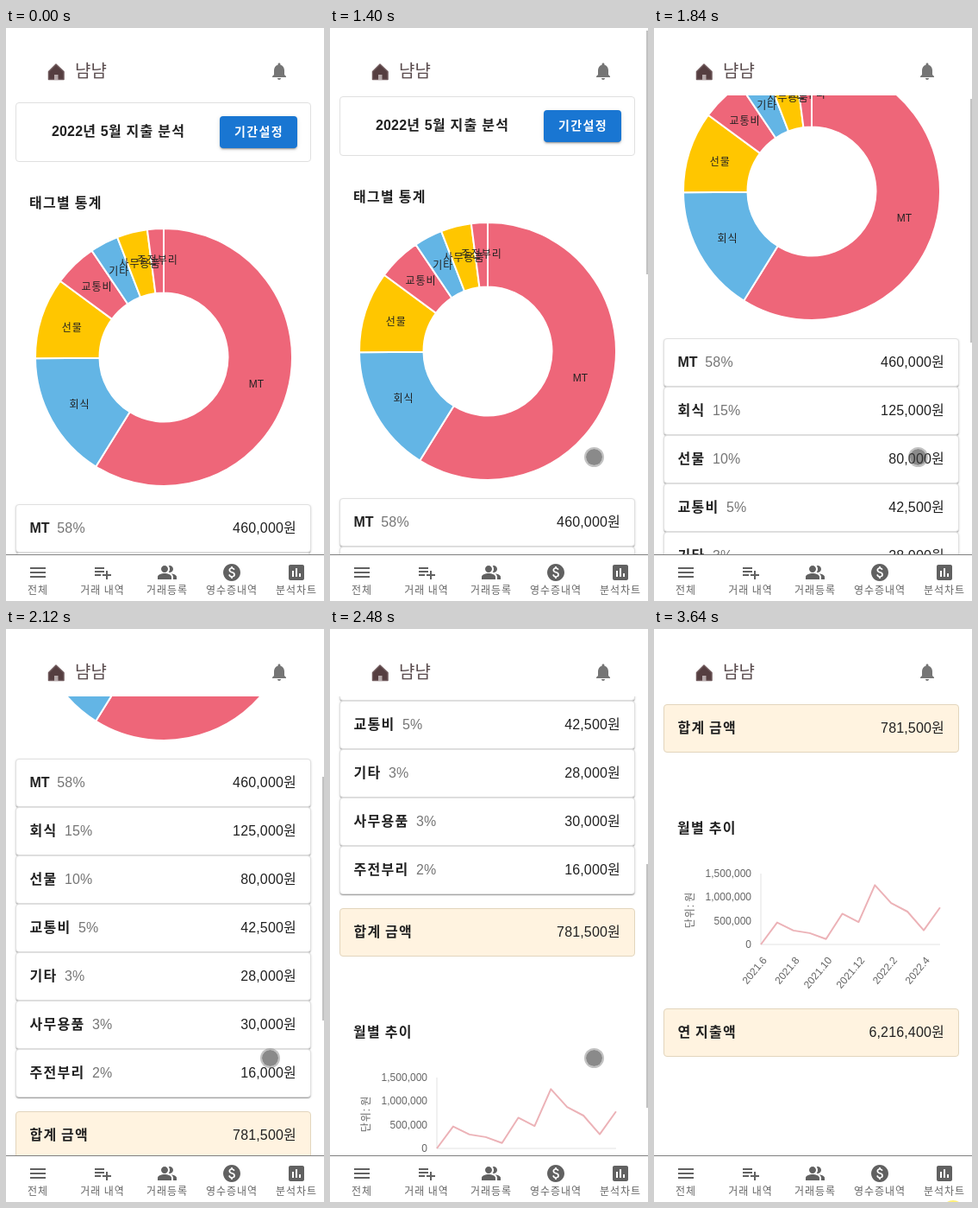
An HTML page that plays this animation: 369x663 px, repeating every 3.72 s.

```html
<!DOCTYPE html>
<html lang="ko">
<head>
<meta charset="utf-8">
<title>지출 분석</title>
<style>
  html, body { margin: 0; width: 100%; height: 100%; overflow: hidden; background: #fff; }
  #stage { position: relative; width: 369px; height: 663px; overflow: hidden; }
  #stage div, svg { position: absolute; box-sizing: border-box; }
  svg { left: 0; top: 0; }
  text { font: 16px "Liberation Sans", "Noto Sans CJK KR", "Noto Sans CJK", sans-serif; fill: #212121; letter-spacing: .15px; }
  .ko { letter-spacing: .08em; }
  .bold { font-weight: 700; }
  .button { font-size: 14px; font-weight: 700; fill: #fff; }
  .button .ko { letter-spacing: .1em; }
  .small { font-size: 12px; letter-spacing: 0; }
  .axis { fill: #666; }
  .tab { font-weight: 300; }
  .brand { font-size: 20px; font-weight: 300; fill: #5a4c4e; }
  .brand .ko { letter-spacing: 0; }
  #view { left: 0; top: 78px; width: 369px; height: 531px; overflow: hidden; }
  #page { left: 0; top: -78px; width: 369px; height: 1560px; }
  .box { left: 11px; width: 343px; height: 56px; border-radius: 4px; background: #fff; border: 1px solid #e0e0e0; }
  .card { box-shadow: 0 2px 1px -1px rgba(0,0,0,.2), 0 1px 1px rgba(0,0,0,.14), 0 1px 3px rgba(0,0,0,.12); }
  .sum { background: #fff3e0; border-color: #e2d5bd; }
  #period { left: 248px; top: 102px; width: 90px; height: 37px; border-radius: 4px; background: #1976d2;
    box-shadow: 0 3px 1px -2px rgba(0,0,0,.2), 0 2px 2px rgba(0,0,0,.14), 0 1px 5px rgba(0,0,0,.12); }
  #nav { left: 0; top: 609px; width: 369px; height: 54px; border-top: 1px solid #808080; background: #fff; }
  #bar { left: 367px; top: 0; width: 2px; height: 282px; background: #c2c2c2; }
  #touch { left: 0; top: 485px; width: 23px; height: 23px; border-radius: 50%; background: rgba(60,60,60,.6);
    background-clip: padding-box; border: 2px solid rgba(120,120,120,.45); }
</style>
</head>
<body>
<div id="stage">
  <div id="view"><div id="page"></div></div>
  <div id="nav"></div>
  <svg id="chrome" width="369" height="663"></svg>
  <div id="bar"></div>
  <div id="touch"></div>
</div>
<script>
const $ = id => document.getElementById(id);
const LOOP = 3720, TICK = 40;

const items = [
  ['MT', 460000, 58], ['회식', 125000, 15], ['선물', 80000, 10], ['교통비', 42500, 5],
  ['기타', 28000, 3], ['사무용품', 30000, 3], ['주전부리', 16000, 2]
];
const total = items.reduce((sum, item) => sum + item[1], 0);
const won = n => n.toLocaleString('en-US') + '원';

const spaced = s => s.replace(/[가-힣]+/g, '<tspan class="ko">$&</tspan>');
const text = (x, y, s, cls = '', anchor = 'start', extra = '') =>
  `<text x="${x}" y="${y}" class="${cls}" text-anchor="${anchor}" ${extra}>${spaced(s)}</text>`;
const box = (y, cls, h = 56) => `<div class="box ${cls}" style="top:${y}px;height:${h}px"></div>`;
const row = (y, label, amount, percent) =>
  `<text x="27.4" y="${y}"><tspan class="bold">${spaced(label)}</tspan>` +
  (percent ? `<tspan dx="8.5" fill="#757575">${percent}%</tspan>` : '') + '</text>' +
  text(338, y, won(amount), '', 'end');

function donut(cx, cy, outer, inner) {
  const colors = ['#ee6679', '#63b5e5', '#ffc600'];
  const at = (r, turn) => [cx + r * Math.sin(turn * 2 * Math.PI), cy - r * Math.cos(turn * 2 * Math.PI)];
  let slices = '', labels = '', start = 0;
  items.forEach(([label, amount], i) => {
    const end = start + amount / total, big = +(end - start > .5);
    slices += `<path fill="${colors[i % 3]}" stroke="#fff" stroke-width="2" d="M${at(outer, start)}
      A${outer} ${outer} 0 ${big} 1 ${at(outer, end)}L${at(inner, end)}
      A${inner} ${inner} 0 ${big} 0 ${at(inner, start)}Z"/>`;
    const [x, y] = at((outer + inner) / 2, (start + end) / 2);
    labels += text(x, y + 4, label, 'small', 'middle');
    start = end;
  });
  return slices + labels;
}

function lineChart(left, bottom) {
  const values = [0, 465, 295, 240, 115, 650, 475, 1255, 875, 695, 300, 781.5];
  const months = ['2021.6', '2021.8', '2021.10', '2021.12', '2022.2', '2022.4'];
  const step = 18.9, height = 82;
  const points = values.map((v, i) => [left + i * step, bottom - v / 1500 * height]);
  let out = `<path d="M${left} ${bottom - height}V${bottom}H${left + 11 * step}" fill="none" stroke="#e2e2e2"/>
    <polyline points="${points.join(' ')}" fill="none" stroke="#ecb2b7" stroke-width="2" stroke-linejoin="round"/>`;
  for (let i = 0; i < 4; i++)
    out += text(113, bottom - i * height / 3 + 4, (i * 500000).toLocaleString('en-US'), 'small axis', 'end');
  months.forEach((m, i) => {
    const x = left + i * 2 * step + 4.5, y = bottom + 16;
    out += text(x, y + 4, m, 'small axis', 'end', `transform="rotate(-50 ${x} ${y})"`);
  });
  const y = bottom - 40;
  return out + text(42, y + 4, '단위: 원', 'small axis', 'middle', `transform="rotate(-90 42 ${y})"`);
}

$('page').innerHTML =
  box(86, '', 69) + '<div id="period"></div>' +
  items.map((_, i) => box(551 + 56 * i, 'card')).join('') +
  box(959, 'sum') + box(1311, 'sum') +
  '<svg width="369" height="1560">' +
  text(53, 125, '2022년 5월 지출 분석', 'bold') +
  text(293.5, 125, '기간설정', 'button', 'middle') +
  text(27, 208, '태그별 통계', 'bold') +
  donut(183, 381, 149, 74.5) +
  items.map(([label, amount, percent], i) => row(584 + 56 * i, label, amount, percent)).join('') +
  row(992, '합계 금액', total) +
  text(27, 1108, '월별 추이', 'bold') +
  lineChart(124, 1237) +
  row(1344, '연 지출액', 6216400) +
  '</svg>';

const bell = 'M12 22c1.1 0 2-.9 2-2h-4c0 1.1.89 2 2 2zm6-6v-5c0-3.07-1.64-5.64-4.5-6.32V4c0-.83-.67-1.5-1.5-1.5s-1.5.67-1.5 1.5v.68C7.63 5.36 6 7.92 6 11v5l-2 2v1h16v-1l-2-2z';
const tabs = [
  ['전체', 37, 'M3 18h18v-2H3v2zm0-5h18v-2H3v2zm0-7v2h18V6H3z'],
  ['거래 내역', 112, 'M14 10H3v2h11v-2zm0-4H3v2h11V6zm4 8v-4h-2v4h-4v2h4v4h2v-4h4v-2h-4zM3 16h7v-2H3v2z'],
  ['거래등록', 187, 'M16.67 13.13C18.04 14.06 19 15.32 19 17v3h4v-3c0-2.18-3.57-3.47-6.33-3.87zM15 12c2.21 0 4-1.79 4-4s-1.79-4-4-4c-.47 0-.91.1-1.33.24C14.5 5.27 15 6.58 15 8s-.5 2.73-1.33 3.76c.42.14.86.24 1.33.24zM9 12c2.21 0 4-1.79 4-4s-1.79-4-4-4-4 1.79-4 4 1.79 4 4 4zm0 1c-2.67 0-8 1.34-8 4v3h16v-3c0-2.66-5.33-4-8-4z'],
  ['영수증내역', 262, 'M12 2C6.48 2 2 6.48 2 12s4.48 10 10 10 10-4.48 10-10S17.52 2 12 2zm.88 15.76V19h-1.75v-1.29c-.74-.18-2.39-.77-3.02-2.96l1.65-.67c.06.22.58 2.09 2.4 2.09.93 0 1.98-.48 1.98-1.61 0-.96-.7-1.46-2.28-2.03-1.1-.39-3.35-1.03-3.35-3.31 0-.1.01-2.4 2.62-2.96V5h1.75v1.24c1.84.32 2.51 1.79 2.66 2.23l-1.58.67c-.11-.35-.59-1.34-1.9-1.34-.7 0-1.81.37-1.81 1.39 0 .95.86 1.31 2.64 1.9 2.4.83 3.01 2.05 3.01 3.45 0 2.63-2.5 3.13-3 3.16z'],
  ['분석차트', 337, 'M19 3H5c-1.1 0-2 .9-2 2v14c0 1.1.9 2 2 2h14c1.1 0 2-.9 2-2V5c0-1.1-.9-2-2-2zM9 17H7v-7h2v7zm4 0h-2V7h2v10zm4 0h-2v-4h2v4z']
];
const icon = (x, y, d, fill) => `<path transform="translate(${x - 12} ${y - 12})" fill="${fill}" d="${d}"/>`;

$('chrome').innerHTML =
  '<path d="M58 42L67 50.5V59.5H49.5V50.5Z" fill="#553e40" stroke="#6f595b" stroke-width="1.5" stroke-linejoin="round"/>' +
  '<path d="M56 54H60.5V60H56Z" fill="#b5a8a9"/>' +
  text(80, 56.5, '냠냠', 'brand') +
  icon(317, 50, bell, '#757575') +
  tabs.map(([label, x, d]) => icon(x, 630, d, '#616161') + text(x, 654.5, label, 'small axis tab', 'middle')).join('') +
  '<circle id="glow" cx="347" cy="674" r="13" fill="#fff176"/>';

// Each swipe: start time, duration, resting scroll offset.
const swipes = [[1360, 240, 161], [1800, 160, 400], [2120, 160, 635], [2480, 160, 872]];
const clamp = v => Math.min(1, Math.max(0, v));
const ease = p => p < .5 ? 4 * p ** 3 : 1 - 4 * (1 - p) ** 3;

function scrollAt(t) {
  let y = 0;
  for (const [start, duration, rest] of swipes)
    if (t >= start) y += (rest - y) * ease(clamp((t - start + 16) / (duration + 16)));
  return Math.round(y);
}

function draw(now) {
  const t = Math.floor(now % LOOP / TICK) * TICK;
  const y = scrollAt(t);
  $('page').style.transform = `translateY(${-y}px)`;
  $('bar').style.transform = `translateY(${Math.round(y * .4275)}px)`;
  $('bar').style.opacity = t < 1360 ? 0 : clamp((3160 - t) / 320);
  $('touch').style.transform = `translateX(${332 - 26 * clamp((t - 920) / 80) - 11}px)`;
  $('touch').style.visibility = t >= 920 && t < 3160 ? 'visible' : 'hidden';
  $('glow').style.visibility = t >= 3640 ? 'visible' : 'hidden';
}

function loop() {
  draw(performance.now());
  requestAnimationFrame(loop);
}
loop();
</script>
</body>
</html>
```
